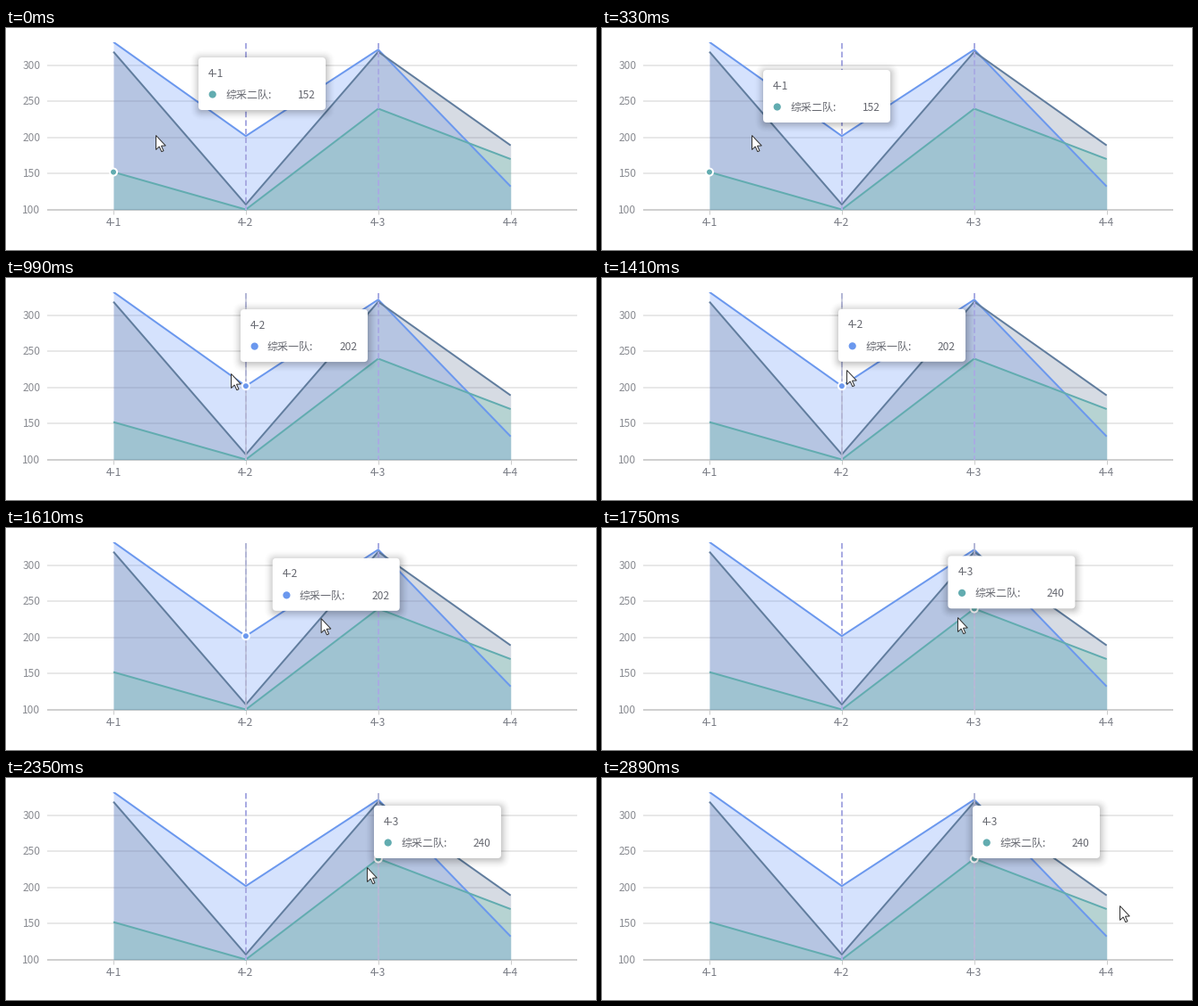
A matplotlib script for the animation above (2960 ms loop, 659x249 px).

```python
import matplotlib.pyplot as plt
import numpy as np
from matplotlib.animation import FuncAnimation
from matplotlib.patches import Circle, FancyBboxPatch, Polygon
from matplotlib.transforms import Affine2D

WIDTH, HEIGHT, DPI = 659, 249, 100
LOOP, STEP = 2960, 20
PX = 72 / DPI
plt.rcParams["font.family"] = "Noto Sans CJK JP"

DAYS = ["4-1", "4-2", "4-3", "4-4"]
DAY_X = 120 + 147.9 * np.arange(4)
BASE, TOP = 203.6, 16

# name, values, fill colour, line colour
SERIES = [
    ("综采一队:", [332.5, 202, 322, 132], "#5b8ff9", "#6b98ee"),
    ("综采二队:", [152, 100, 240, 170], "#5ad8a6", "#62acb0"),
    ("综采三队:", [319, 107, 319, 189], "#5d7092", "#617d9e"),
]

# start time, day, series
HOVERS = [(0, 0, 1), (715, 1, 0), (1605, 2, 1)]

# the screen refreshes in bursts while the mouse is active: first, last, count
BURSTS = [(70, 330, 5), (650, 1120, 8), (1410, 1880, 8),
          (1940, 2210, 5), (2620, 2890, 5)]
REFRESH = np.concatenate([[0]] + [np.linspace(*burst) for burst in BURSTS])

# moves: start, end, goal
CURSOR_START = (167, 120)
CURSOR_MOVES = [(600, 850, (251, 107)), (1380, 1410, (273, 103)),
                (1410, 1750, (397, 100)), (1900, 2010, (403, 100)),
                (2600, 2890, (578, 143))]
TIP_START = (250, 19)
TIP_MOVES = [(-330, 330, (180, 47)), (650, 1020, (264, 34.8)),
             (1410, 1820, (398, 31)), (1880, 2040, (411, 31)),
             (2620, 2890, (414, 31))]


def ease_out(u):
    return u * (2 - u)


def smoothstep(u):
    return u * u * (3 - 2 * u)


def position(start, moves, ease, t):
    point = np.array(start, float)
    for begin, end, goal in moves:
        point += (goal - point) * ease(np.clip((t - begin) / (end - begin), 0, 1))
    return point


def to_y(value):
    return BASE - (np.asarray(value) - 100) * 0.808


fig = plt.figure(figsize=(WIDTH / DPI, HEIGHT / DPI), dpi=DPI, facecolor="white")
ax = fig.add_axes([0, 0, 1, 1])
ax.set_xlim(0, WIDTH)
ax.set_ylim(HEIGHT, 0)
ax.axis("off")

tip_move, cursor_move = Affine2D(), Affine2D()
tip_space = tip_move + ax.transData
cursor_space = cursor_move + ax.transData


def line(xs, ys, color, width=2, **kw):
    return ax.plot(xs, ys, color=color, lw=width * PX,
                   solid_capstyle="butt", dash_capstyle="butt", **kw)[0]


def label(x, y, text, color, ha="left", **kw):
    return ax.text(x, y, text, color=color, fontsize=12 * PX, ha=ha,
                   va="baseline", **kw)


def rounded(x, y, w, h, radius, **kw):
    return ax.add_patch(FancyBboxPatch(
        (x, y), w, h, boxstyle=f"round,pad=0,rounding_size={radius}",
        transform=tip_space, **kw))


def draw_chart():
    for value in range(100, 301, 50):
        y = float(to_y(value))
        line([46, 637.5], [y, y], "#cfcfcf" if value == 100 else "#e8e8e8", zorder=1)
        label(38.5, y + 4, str(value), "#8a8c92", "right")
    for x, day in zip(DAY_X, DAYS):
        line([x, x], [BASE, BASE + 5], "#cccccc", 1, zorder=1)
        label(x, 221.7, day, "#777a83", "center")
    plot_area = ax.transData.transform_bbox(
        ax.viewLim.from_extents(0, TOP, WIDTH, BASE + 1))
    for _, values, fill, stroke in SERIES:
        y = to_y(values)
        ax.fill_between(DAY_X, y, BASE, color=fill, alpha=0.25, lw=0, zorder=2)
        line(DAY_X, y, stroke, zorder=3).set_clip_box(plot_area)
    for x in DAY_X[1:3]:
        line([x, x], [TOP + 1, BASE], "#a9abe2", zorder=4, dashes=(3.2, 1.6))


def draw_tooltip():
    w, h = 142, 59
    grows = np.arange(10, -5, -1)
    weights = np.exp(-(grows / 5.5) ** 2 / 2)
    for grow, weight in zip(grows, 0.3 * weights / weights.sum()):
        rounded(0.5 - grow, 1.5 - grow, w + 2 * grow, h + 2 * grow,
                max(4 + grow, 2), fc="black", alpha=weight, lw=0, zorder=7)
    rounded(0, 0, w, h, 4, fc="white", lw=0, zorder=8)
    style = dict(color="#666870", transform=tip_space, zorder=9)
    title = label(11.2, 21.5, "", **style)
    name = label(30, 45.7, "", **style)
    value = label(130.5, 45.7, "", ha="right", **style)
    dot = ax.add_patch(Circle((15.7, 41.5), 4.1, lw=0, transform=tip_space, zorder=9))
    return title, name, value, dot


draw_chart()
pointer = line([0, 0], [TOP + 1, BASE], "#b9bdd2", zorder=5, alpha=0.7)
marker = ax.add_patch(Circle((0, 0), 4, ec="white", lw=2 * PX, zorder=6))
title, name, value, dot = draw_tooltip()
ARROW = [(0.5, 0.5), (0.5, 16.5), (4.2, 13), (6.8, 18.7), (9, 17.7),
         (6.5, 12.2), (11.3, 12)]
ax.add_patch(Polygon(ARROW, fc="white", ec="#333333", lw=PX, joinstyle="miter",
                     transform=cursor_space, zorder=10))


def update(i):
    now = i * STEP + STEP / 2
    t = REFRESH[REFRESH <= now].max()
    cursor_move.clear().translate(*position(CURSOR_START, CURSOR_MOVES, ease_out, t))
    tip_move.clear().translate(*position(TIP_START, TIP_MOVES, smoothstep, t))

    _, day, series = [hover for hover in HOVERS if hover[0] <= t][-1]
    team, values, _, color = SERIES[series]
    pointer.set_xdata([DAY_X[day]] * 2)
    pointer.set_visible(day > 0)
    marker.center = DAY_X[day], float(to_y(values[day]))
    marker.set_facecolor(color)
    dot.set_facecolor(color)
    title.set_text(DAYS[day])
    name.set_text(team)
    value.set_text(str(values[day]))
    return pointer, marker, dot, title, name, value


anim = FuncAnimation(fig, update, frames=LOOP // STEP, interval=STEP,
                     repeat=True, repeat_delay=0, blit=False)
plt.show()
```
